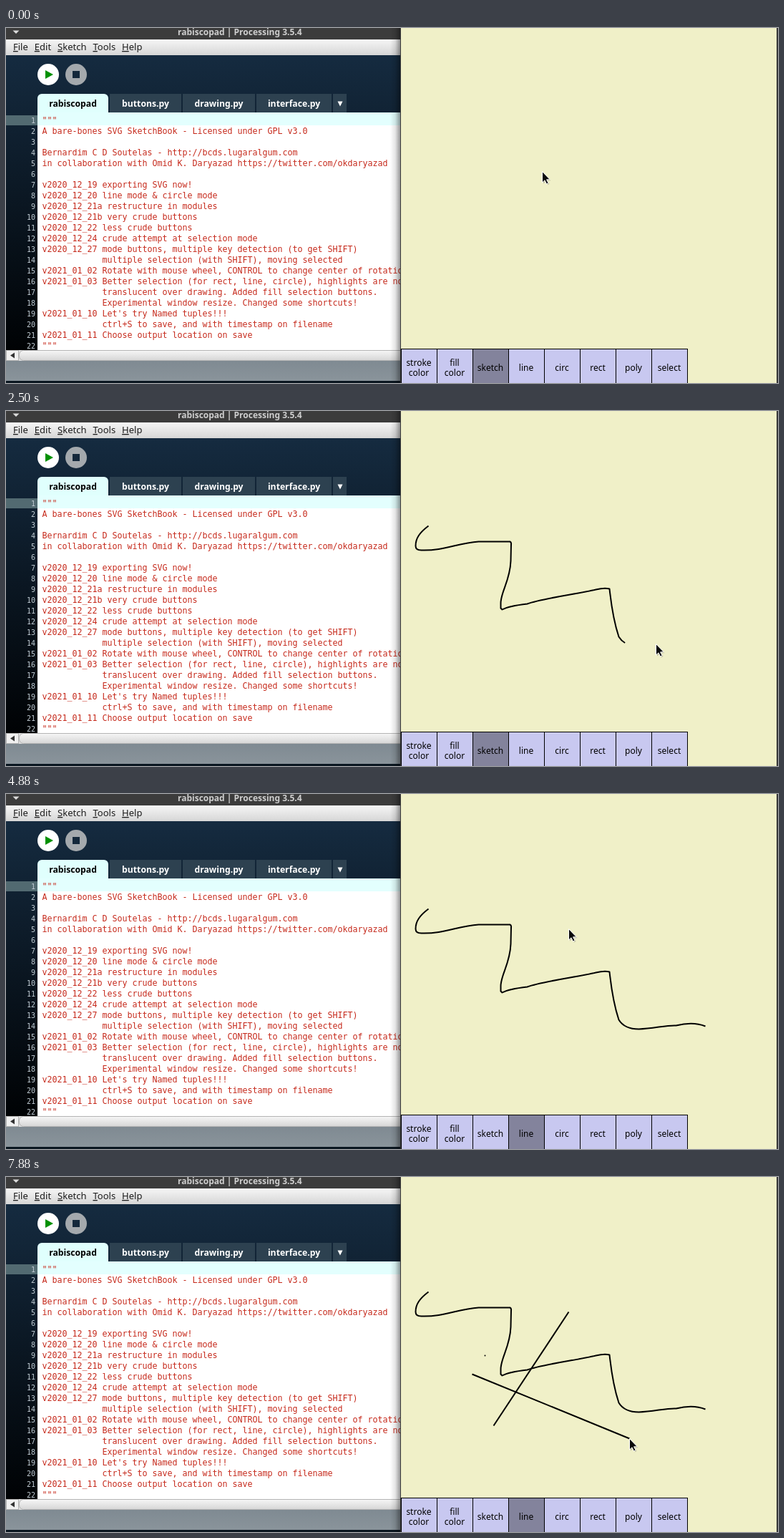
Write an HTML page that moves like this. It is 1079 px wide and 496 px high and loops after 8000 ms.

```html
<!DOCTYPE html>
<html lang="en">
<head>
<meta charset="utf-8">
<title>rabiscopad</title>
<style>
  html, body { margin: 0; width: 100%; height: 100%; overflow: hidden; background: #f0f0c8; }
  svg { display: block; width: 100%; height: 100%; }
  text { font-family: "Noto Sans", "Open Sans", sans-serif; white-space: pre; }
  .title { font-size: 12px; font-weight: bold; fill: #cfcfcf; }
  .menu { font-size: 13px; fill: #1c1c1c; }
  .initial { text-decoration: underline; }
  .tab { font-size: 12.2px; font-weight: bold; fill: #fff; text-anchor: middle; }
  .code { font: 11.63px "DejaVu Sans Mono", monospace; fill: #c62a1c; }
  .number { font: 10px "DejaVu Sans Mono", monospace; fill: #c3ced6; text-anchor: end; }
  .button { font-size: 12px; text-anchor: middle; }
  .ink { fill: none; stroke: #000; stroke-width: 2; stroke-linejoin: round; }
</style>
</head>
<body>
<svg viewBox="0 0 1079 496" preserveAspectRatio="none">
  <defs>
    <linearGradient id="navy" x2="0" y2="1"><stop stop-color="#152b40"/><stop offset="1" stop-color="#000204"/></linearGradient>
    <linearGradient id="bar" x2="0" y2="1"><stop stop-color="#f6f6f6"/><stop offset="1" stop-color="#d6d6d6"/></linearGradient>
    <linearGradient id="status" x2="0" y2="1"><stop stop-color="#7f8a92"/><stop offset="1" stop-color="#8a949b"/></linearGradient>
    <linearGradient id="shadow"><stop stop-opacity="0"/><stop offset=".5" stop-opacity=".1"/><stop offset="1" stop-opacity=".4"/></linearGradient>
  </defs>

  <rect width="552" height="16" fill="#3c3c3c"/>
  <path d="M9.5 3.5h9l-4.500 4.500z" fill="#dcdcdc"/>
  <text class="title" x="240" y="10">rabiscopad | Processing 3.5.4</text>
  <rect y="16" width="552" height="22" fill="url(#bar)"/>
  <text id="menu" class="menu" x="1" y="31"></text>

  <rect y="38" width="552" height="412" fill="url(#navy)"/>
  <circle cx="59" cy="65" r="15" fill="#fff"/>
  <path d="M55 59v12l11-6z" fill="#009000"/>
  <circle cx="98" cy="65" r="15" fill="#a4a9ad"/>
  <rect x="93" y="60" width="10" height="10" fill="#14283b"/>
  <g id="tabs"></g>
  <path d="M463.500 102.500h7l-3.500 7z" fill="#fff"/>

  <rect x="44" y="118" width="508" height="332" fill="#fff"/>
  <rect x="44" y="118" width="508" height="18" fill="#e3fffe"/>
  <rect y="122" width="44" height="14" fill="#526a71"/>
  <g id="code"></g>

  <rect y="450" width="552" height="15" fill="#dedede"/>
  <rect x=".5" y="450.500" width="17" height="14" fill="#f0f0f0" stroke="#b4b4b4"/>
  <path d="M12 453.500v8l-6-4z" fill="#333"/>
  <rect x="18.500" y="450.500" width="540" height="14" rx="6" fill="url(#bar)" stroke="#b4b4b4"/>
  <rect y="465" width="552" height="28" fill="url(#status)"/>
  <rect y="493" width="552" height="3" fill="#0b1721"/>

  <rect x="537" width="14" height="496" fill="url(#shadow)"/>
  <rect x="551" width="528" height="496" fill="#3a3a3a"/>
  <rect x="552" width="525" height="496" fill="#f0f0c8"/>
  <g id="buttons"></g>
  <g transform="translate(.5 .5)">
    <path id="sketch" class="ink" d="M590 160C578 169 572 177 572 188Q572 194 580 194C612 195 630 184 660 182
      H704Q706 183 705.500 186L705 209C704 237 691 252 691 268V275L693 277Q702 272 728 269C750 261 800 255 824 249
      Q836 246 843 248C847 285 852 303 856 315Q864 328 884 328C905 327 925 322 936 323Q960 317 977 324"/>
    <line id="first" class="ink"/>
    <circle id="dot" cx="669" cy="249" r="1"/>
    <line id="second" class="ink"/>
  </g>
  <g id="cursor">
    <path d="M1.500 2v15l3.500-3.200 2.500 5 2.500-1.200-2.300-4.800h4.300z" opacity=".2"/>
    <path d="M0 0v15.500l3.500-3.200 2.500 5.200 2.600-1.200-2.500-5h4.700z" fill="#0a0a0a" stroke="#fff"/>
  </g>
</svg>
<script>
const LOOP = 8000, BEAT = 125;
const $ = id => document.getElementById(id);
const set = (node, attrs) => {
  for (const name in attrs) node.setAttribute(name, attrs[name]);
};
const add = (parent, tag, attrs, content = "") => {
  const node = document.createElementNS("http://www.w3.org/2000/svg", tag);
  set(node, attrs);
  node.innerHTML = content;
  return $(parent).appendChild(node);
};

for (const word of ["File", "Edit", "Sketch", "Tools", "Help"])
  add("menu", "tspan", { dx: 9 }, `<tspan class="initial">${word[0]}</tspan>${word.slice(1)}`);

let tabLeft = 44;
for (const [name, width] of [["rabiscopad", 99], ["buttons.py", 100], ["drawing.py", 101], ["interface.py", 105], ["", 19]]) {
  const active = name === "rabiscopad";
  add("tabs", "rect", { x: tabLeft, y: 92, width, height: 32, rx: active ? 6 : 0, fill: active ? "#e0fffd" : "#2d4150" });
  add("tabs", "text", { class: "tab", x: tabLeft + width / 2, y: 110, style: active ? "fill:#000" : "" }, name);
  tabLeft += width + 2;
}

const code = `"""
A bare-bones SVG SketchBook - Licensed under GPL v3.0

Bernardim C D Soutelas - http://bcds.lugaralgum.com
in collaboration with Omid K. Daryazad https://twitter.com/okdaryazad

v2020_12_19 exporting SVG now!
v2020_12_20 line mode &amp; circle mode
v2020_12_21a restructure in modules
v2020_12_21b very crude buttons
v2020_12_22 less crude buttons
v2020_12_24 crude attempt at selection mode
v2020_12_27 mode buttons, multiple key detection (to get SHIFT)
            multiple selection (with SHIFT), moving selected
v2021_01_02 Rotate with mouse wheel, CONTROL to change center of rotation
v2021_01_03 Better selection (for rect, line, circle), highlights are now
            translucent over drawing. Added fill selection buttons.
            Experimental window resize. Changed some shortcuts!
v2021_01_10 Let's try Named tuples!!!
            ctrl+S to save, and with timestamp on filename
v2021_01_11 Choose output location on save
"""`;
code.split("\n").forEach((line, i) => {
  const y = 133 + 15 * i;
  add("code", "text", { class: "number", x: 41, y }, i + 1);
  add("code", "text", { class: "code", x: 50.5, y }, line);
});

const buttons = ["stroke color", "fill color", "sketch", "line", "circ", "rect", "poly", "select"].map((label, i) => {
  const left = 552 + 50 * i, words = label.split(" ");
  const box = add("buttons", "rect", { x: left + .5, y: 448.5, width: 50, height: 50, stroke: "#000" });
  words.forEach((word, row) =>
    add("buttons", "text", { class: "button", x: left + 25, y: words.length > 1 ? 472 + 14 * row : 479 }, word));
  return { label, left, box };
});

const sketch = $("sketch"), sketchLength = sketch.getTotalLength();
const SKETCH_START = 13, SKETCH_BEATS = 8.25;
const lengthDrawn = beat =>
  sketchLength * Math.min(1, Math.max(0, (beat - SKETCH_START) / SKETCH_BEATS) ** 1.25);

// Pointer moves between rests; freehand drawing follows the sketch path instead.
const moves = [
  { from: 1, to: 2, x: 749, y: 197 },
  { from: 3, to: 7, x: 424, y: 200 },
  { from: 7, to: 13, x: 584, y: 163 },
  { from: 13, to: 21, x: 977, y: 324 },
  { from: 21, to: 24, x: 790, y: 435 },
  { from: 27, to: 31, x: 730, y: 477 },
  { from: 33, to: 39, x: 786, y: 188 },
  { from: 40, to: 43, x: 681, y: 347 },
  { from: 44, to: 47, x: 669, y: 249 },
  { from: 49, to: 52, x: 745, y: 254 },
  { from: 52, to: 56, x: 651, y: 275 },
  { from: 56, to: 60, x: 1012, y: 311 },
  { from: 60, to: 63, x: 871, y: 365 }
];
const easeOut = u => 1 - (1 - u) ** 2;

function pointerAt(beat) {
  if (beat > SKETCH_START && beat < 21) {
    return sketch.getPointAtLength(lengthDrawn(beat + .5));
  }
  let place = { x: 749, y: 200 };
  for (const { from, to, x, y } of moves) {
    if (beat <= from) break;
    const u = easeOut(Math.min(1, (beat - from) / (to - from)));
    place = { x: place.x + (x - place.x) * u, y: place.y + (y - place.y) * u };
  }
  return place;
}

const show = (id, visible) => set($(id), { visibility: visible ? "visible" : "hidden" });

function dragLine(id, beat, press, release) {
  const start = pointerAt(press), end = pointerAt(Math.min(beat, release));
  set($(id), { x1: start.x, y1: start.y, x2: end.x, y2: end.y });
  show(id, beat > press);
}

function draw(beat) {
  const { x, y } = pointerAt(beat);
  set($("cursor"), { transform: `translate(${Math.round(x) + .5} ${Math.round(y) + .5})` });

  const mode = beat < 34 ? "sketch" : "line";
  for (const { label, left, box } of buttons) {
    const hovered = y > 448 && x > left && x < left + 50;
    set(box, { fill: hovered || label === mode ? "#83839c" : "#c8c8f0" });
  }

  set(sketch, { "stroke-dasharray": `${lengthDrawn(beat)} ${sketchLength}` });
  show("sketch", beat > SKETCH_START);
  dragLine("first", beat, 40, 43);
  dragLine("second", beat, 56, 63);
  show("dot", beat >= 47);
}

const start = performance.now();
function tick() {
  const time = (performance.now() - start) % LOOP;
  draw(Math.min(63, Math.floor((time + 2) / BEAT)));
  requestAnimationFrame(tick);
}
tick();
</script>
</body>
</html>
```
